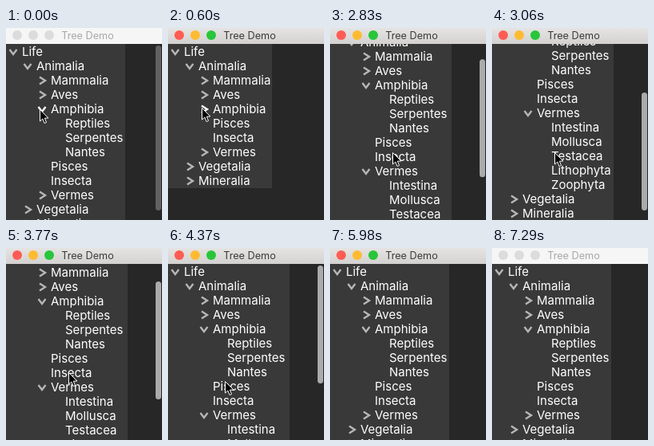
An HTML page with a canvas for the animation above (7.41 s loop, 195x241 px).

```html
<!DOCTYPE html>
<html lang="en">
<head>
<meta charset="utf-8">
<title>Tree Demo</title>
<style>
html, body { margin: 0; width: 100%; height: 100%; overflow: hidden; background: #272727; }
canvas { display: block; width: 195px; height: 241px; }
</style>
</head>
<body>
<canvas id="stage"></canvas>
<script>
const W = 195, H = 241, BAR = 20, ROW = 18, LOOP = 7410;
const canvas = document.getElementById('stage');
const ctx = canvas.getContext('2d');
const dpr = window.devicePixelRatio || 1;
canvas.width = W * dpr;
canvas.height = H * dpr;

const leaves = names => names.split(' ').map(name => ({ name }));
const amphibia = { name: 'Amphibia', kids: leaves('Reptiles Serpentes Nantes') };
const vermes = { name: 'Vermes', kids: leaves('Intestina Mollusca Testacea Lithophyta Zoophyta') };
const closed = name => ({ name, kids: [], open: false });
const tree = {
  name: 'Life', open: true, kids: [
    { name: 'Animalia', open: true, kids: [
      closed('Mammalia'), closed('Aves'), amphibia,
      { name: 'Pisces' }, { name: 'Insecta' }, vermes
    ] },
    closed('Vegetalia'), closed('Mineralia')
  ]
};

const within = (t, a, b) => t >= a && t < b;
const lerp = (a, b, f) => a + (b - a) * f;
const ease = f => 0.4 * f + 0.6 * f * f * (3 - 2 * f);

// Progress made in n equal jumps, the first at a and the last at b.
function steps(t, a, b, n) {
  if (t < a) return 0;
  if (t >= b) return 1;
  return Math.min(n, Math.floor((t - a) / (b - a) * (n - 1) + 0.1) + 1) / n;
}

// Each move: start, end, jumps, target x, target y
const moves = [
  [60, 120, 2, 42, 100],
  [1610, 1840, 5, 40, 208],
  [2370, 2540, 4, 78, 156],
  [4310, 4650, 7, 46, 204],
  [5420, 5980, 11, 50, 243]
];

function cursorAt(t) {
  let x = 42, y = 102;
  for (const [a, b, n, tx, ty] of moves) {
    const f = ease(steps(t, a, b, n));
    x = lerp(x, tx, f);
    y = lerp(y, ty, f);
  }
  return [Math.round(x), Math.round(y)];
}

function scrollAt(t) {
  const down = ease(steps(t, 2770, 3060, 6));
  const up = ease(steps(t, 3540, 3950, 8));
  return Math.round(103 * (down - up));
}

function flatten(node, depth = 0, rows = []) {
  rows.push({ node, depth });
  if (node.open) node.kids.forEach(kid => flatten(kid, depth + 1, rows));
  return rows;
}

function chevron(x, y, open, color) {
  ctx.strokeStyle = color;
  ctx.lineWidth = 2.4;
  ctx.beginPath();
  if (open) {
    ctx.moveTo(x - 4.5, y - 3);
    ctx.lineTo(x, y + 3);
    ctx.lineTo(x + 4.5, y - 3);
  } else {
    ctx.moveTo(x - 3, y - 4.5);
    ctx.lineTo(x + 4, y);
    ctx.lineTo(x - 3, y + 4.5);
  }
  ctx.stroke();
}

function drawTree(t, scroll) {
  amphibia.open = !within(t, 600, 1310);
  vermes.open = within(t, 2190, 4950);
  const lit = new Set();
  if (t < 2190) lit.add(amphibia);
  if (within(t, 2080, 2190) || within(t, 4830, 5600)) lit.add(vermes);

  const rows = flatten(tree);
  const width = vermes.open ? 152 : amphibia.open ? 149 : 130;
  ctx.fillStyle = '#393939';
  ctx.fillRect(0, BAR, width, rows.length * ROW + 1 - scroll);

  ctx.font = '15px Inter, sans-serif';
  ctx.textAlign = 'left';
  rows.forEach(({ node, depth }, i) => {
    const y = 30 + i * ROW - scroll;
    if (node.kids) chevron(9 + depth * 18, y, node.open, lit.has(node) ? '#fff' : '#b6b6b6');
    ctx.fillStyle = '#fff';
    ctx.fillText(node.name, 20 + depth * 18, y + 5);
  });
}

function drawScrollbar(t, scroll) {
  const alpha = t < 2770
    ? 0.45 * (1 - steps(t, 60, 120, 2))
    : 1 - steps(t, 5480, 5860, 7);
  ctx.globalAlpha = alpha;
  ctx.fillStyle = '#ababab';
  ctx.beginPath();
  ctx.roundRect(187, 22 + scroll * 59 / 103, 7, vermes.open ? 148 : 207, 3.5);
  ctx.fill();
  ctx.globalAlpha = 1;
}

function drawCursor(x, y) {
  const shape = [[0, 0], [0, 14.5], [3.3, 11.5], [5.6, 17], [8, 16], [5.8, 10.7], [10.4, 10.5]];
  ctx.beginPath();
  shape.forEach(([dx, dy]) => ctx.lineTo(x + 0.5 + dx, y + 0.5 + dy));
  ctx.closePath();
  ctx.fillStyle = '#000';
  ctx.fill();
  ctx.strokeStyle = '#fff';
  ctx.lineWidth = 1;
  ctx.stroke();
}

function drawTitleBar(active) {
  const shade = ctx.createLinearGradient(0, 0, 0, BAR);
  shade.addColorStop(0, active ? '#e5e4e3' : '#f6f6f6');
  shade.addColorStop(1, active ? '#d3d2d1' : '#f6f6f6');
  ctx.fillStyle = shade;
  ctx.fillRect(0, 0, W, BAR);
  const dots = active ? ['#ff5c54', '#febb32', '#29c53b'] : ['#dcdcdc', '#dcdcdc', '#dcdcdc'];
  dots.forEach((color, i) => {
    ctx.fillStyle = color;
    ctx.beginPath();
    ctx.arc(14 + i * 20, 9, 6, 0, Math.PI * 2);
    ctx.fill();
  });
  ctx.font = '12.7px Inter, sans-serif';
  ctx.textAlign = 'center';
  ctx.fillStyle = active ? '#3c3c3c' : '#a8a8a8';
  ctx.fillText('Tree Demo', 102, 13.5);
}

function draw(t) {
  const scroll = scrollAt(t);
  ctx.setTransform(dpr, 0, 0, dpr, 0, 0);
  ctx.fillStyle = '#272727';
  ctx.fillRect(0, 0, W, H);
  drawTree(t, scroll);
  drawScrollbar(t, scroll);
  drawTitleBar(within(t, 480, 7290));
  drawCursor(...cursorAt(t));
}

const start = performance.now();
function tick() {
  draw((performance.now() - start) % LOOP);
  requestAnimationFrame(tick);
}
tick();
</script>
</body>
</html>
```
